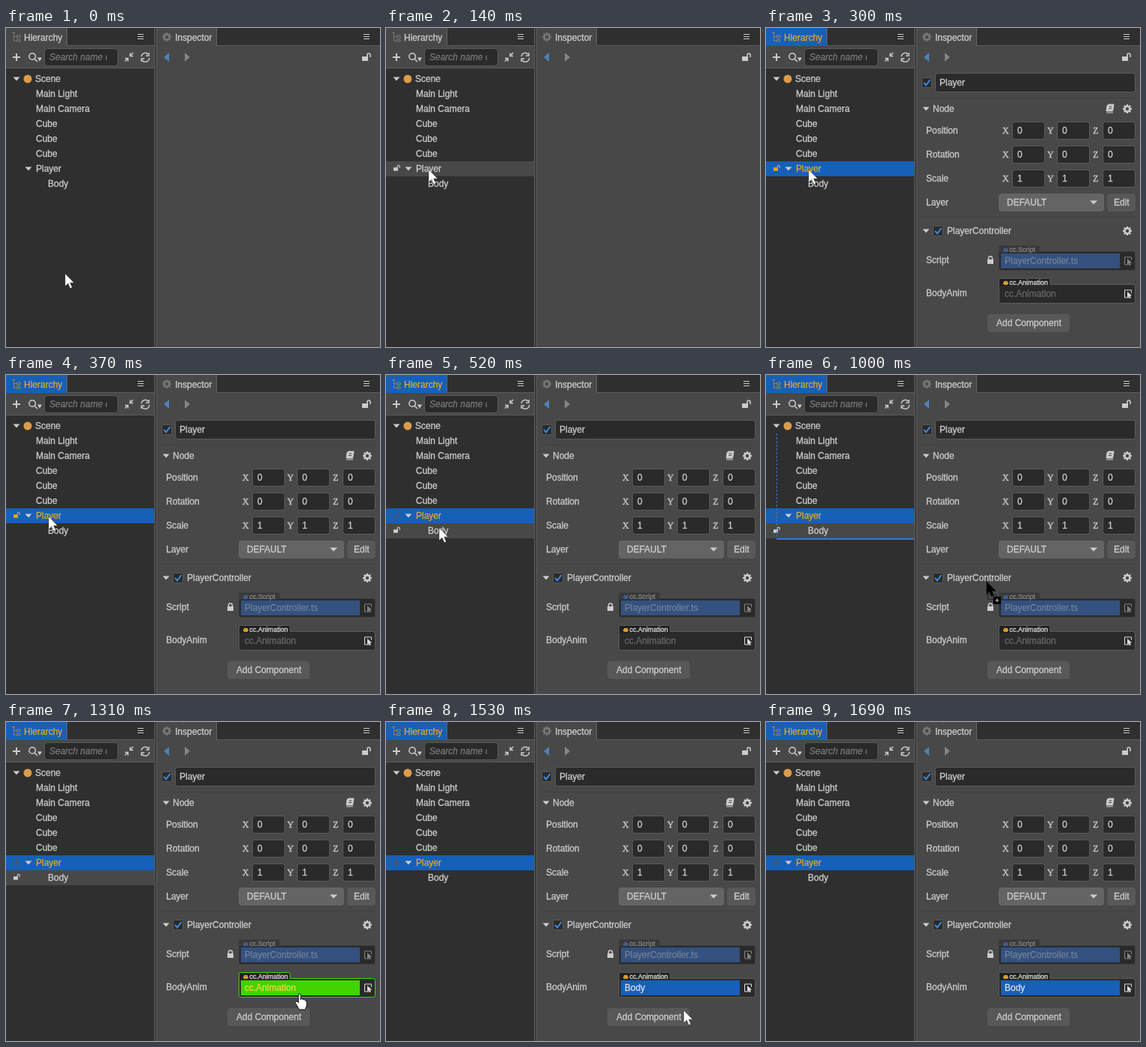
An HTML page with a canvas for the animation above (1.77 s loop, 500 by 426 pixels).

```html
<!DOCTYPE html>
<html lang="en">
<head>
<meta charset="utf-8">
<title>Assigning a node to a component property</title>
<style>
html, body { margin: 0; width: 100%; height: 100%; overflow: hidden; background: #484848; }
canvas { display: block; }
</style>
</head>
<body>
<canvas id="stage" width="500" height="426"></canvas>
<script>
const c = document.getElementById('stage').getContext('2d');
const LOOP = 1770;
const SANS = '"Liberation Sans", Arial, sans-serif';
const PANEL = '#484848', DARK = '#2f2f2f', FIELD = '#2a2a2a', EDGE = '#5b5b5b';
const TEXT = '#cccccc', DIM = '#777777', BLUE = '#1660b8', ORANGE = '#e2a52b';

// [time, x, y, shape]: the pointer holds each pose until the next one
const POINTER = [
  [0, 79, 328, 'arrow'], [60, 66, 257, 'arrow'], [140, 57, 189, 'arrow'],
  [450, 63, 197, 'arrow'], [520, 71, 204, 'arrow'], [600, 75.5, 208, 'arrow'],
  [850, 88, 211, 'drag'], [930, 183, 238, 'drag'], [1000, 295, 276, 'drag'],
  [1080, 368, 343, 'drag'], [1160, 391, 363, 'drag'], [1310, 391, 363, 'hand'],
  [1530, 398, 385, 'arrow'], [1610, 410, 410, 'arrow'], [1690, 420, 440, 'arrow']
];
const TREE = ['Main Light', 'Main Camera', 'Cube', 'Cube', 'Cube'];

function rect(x, y, w, h, color) {
  c.fillStyle = color;
  c.fillRect(x, y, w, h);
}

function box(x, y, w, h, fill, stroke, r = 3) {
  c.beginPath();
  c.roundRect(x + .5, y + .5, w - 1, h - 1, r);
  c.fillStyle = fill;
  c.fill();
  c.strokeStyle = stroke || fill;
  c.lineWidth = 1;
  c.stroke();
}

// The hairline stroke gives the slightly heavy look of hinted interface text
function text(s, x, y, color = TEXT, font = '12px ' + SANS) {
  c.font = font;
  c.fillStyle = c.strokeStyle = color;
  c.lineWidth = .3;
  c.fillText(s, x, y + 4);
  c.strokeText(s, x, y + 4);
}

function poly(points, color) {
  c.beginPath();
  for (let i = 0; i < points.length; i += 2) c.lineTo(points[i], points[i + 1]);
  c.closePath();
  c.fillStyle = color;
  c.fill();
}

function path(d, color, width = 1, x = 0, y = 0, fill) {
  c.save();
  c.translate(x, y);
  const shape = new Path2D(d);
  if (fill) {
    c.fillStyle = fill;
    c.fill(shape);
  }
  c.strokeStyle = color;
  c.lineWidth = width;
  c.stroke(shape);
  c.restore();
}

function dot(x, y, r, color) {
  c.beginPath();
  c.arc(x, y, r, 0, 7);
  c.fillStyle = color;
  c.fill();
}

const fold = (x, y, w = 4.5, color = TEXT) =>
  poly([x - w, y - 2.5, x + w, y - 2.5, x, y + 2.5], color);

function gear(x, y, color) {
  c.save();
  c.translate(x, y);
  c.strokeStyle = color;
  c.lineWidth = 2.4;
  c.beginPath();
  c.arc(0, 0, 3.4, 0, 2 * Math.PI);
  c.stroke();
  for (let i = 0; i < 8; i++) {
    c.rotate(Math.PI / 4);
    rect(-1.2, -6, 2.4, 2.5, color);
  }
  c.restore();
}

function openLock(x, y, color, scale = 1) {
  c.save();
  c.translate(x, y);
  c.scale(scale, scale);
  rect(-6, -1, 8, 6, color);
  path('M1 -1V-3A2 2 0 0 1 5 -3V0', color, 1.6);
  c.restore();
}

function menu(x) {
  for (const y of [8, 11, 14]) rect(x - 4, y, 8, 1, TEXT);
}

function checkbox(x, y) {
  box(x - 7, y - 7, 14, 14, FIELD, EDGE, 2);
  path('M-4 0L-1 3.5L4.5 -4', '#3c8be0', 2, x, y);
}

function tab(x, w, label, active) {
  rect(x, 0, w, 24, active ? BLUE : PANEL);
  rect(x + w - 1, 0, 1, 24, '#666666');
  text(label, x + 24, 13, active ? ORANGE : TEXT);
}

function hierarchy(t, hover) {
  const selected = t >= 220;
  rect(0, 0, 198, 426, DARK);
  rect(0, 23, 198, 1, EDGE);
  tab(0, 82, 'Hierarchy', selected);
  path('M8 6.5H12M10.5 7V17.5M10.5 11.5H14M10.5 17H14M14.5 10H19V13H14.5ZM14.5 15.5H19V18H14.5Z',
    selected ? '#98834c' : '#777777');
  menu(180);

  rect(0, 24, 198, 29, PANEL);
  rect(0, 53, 198, 1, EDGE);
  rect(9, 38, 10, 2, TEXT);
  rect(13, 34, 2, 10, TEXT);
  path('M39.5 38A4.3 4.3 0 1 1 30.9 38A4.3 4.3 0 1 1 39.5 38M38 41L42 45', TEXT, 1.5);
  fold(45, 42, 3);
  box(51, 27, 99, 24, FIELD, EDGE, 4);
  c.save();
  c.beginPath();
  c.rect(58, 28, 77, 22);
  c.clip();
  text('Search name or id', 58, 39, DIM, 'italic 12px ' + SANS);
  c.restore();
  path('M170 33L166 37M166 33.5V37.5H170M159 44.5L163 40.5M159 40.5H163V44.5', TEXT, 1.5);
  path('M181 38A5.2 5.2 0 0 1 190 35M191 33V37H187M191.5 40A5.2 5.2 0 0 1 182 43M181 45V41H185', TEXT, 1.4);

  if (hover === 'Player' || selected) rect(0, 178, 198, 20, selected ? BLUE : PANEL);
  if (hover === 'Body') rect(0, 198, 198, 20, PANEL);
  fold(14, 68);
  dot(29, 68, 5.5, '#dc9c4a');
  text('Scene', 39, 68);
  TREE.forEach((name, i) => text(name, 40, 88 + i * 20));
  fold(30, 188);
  text('Player', 40, 188, selected ? ORANGE : TEXT);
  text('Body', 56, 208);
  if (hover === 'Player') openLock(14.5, 187, selected ? ORANGE : TEXT, .75);
  else if (selected) openLock(14.5, 187, '#3f5a78', .75);
  if (hover === 'Body') openLock(14.5, 207, TEXT, .75);

  if (t >= 850 && t < 1080) {
    c.setLineDash([3, 2]);
    path('M14.5 78V218', '#3975d0');
    c.setLineDash([]);
    rect(14, 218, 184, 2, '#3975d0');
  } else if (t >= 1080) rect(14, 182, 1, 12, '#3f5a78');
}

function picker(x, y, color) {
  path('M3 5H-4.5V-5H4.5V-1', color, 1, x, y);
  poly([x - 1, y - 3, x - 1, y + 5, x + 1, y + 3.5, x + 2.5, y + 6, x + 4, y + 5, x + 2.5, y + 3, x + 5, y + 2.5], color);
}

function slot(y, type, value, look) {
  const width = type.length * 4.6 + 14;
  box(311, y - 20, width, 12, look.tab, look.edge, 2);
  box(311, y - 12, 183, 26, FIELD, look.edge);
  rect(312, y - 13, width - 2, 3, look.tab);
  if (look.fill) rect(314, y - 9, 159, 20, look.fill);
  rect(318, y - 16, 5, 5, look.icon);
  rect(317, y - 14, 7, 2, look.icon);
  text(type, 325.5, y - 15, look.label, '9px ' + SANS);
  text(value, 319, y + 1, look.text);
  picker(484, y + 1, look.pick);
}

function inspector(t) {
  rect(198, 0, 4, 426, '#3c3c3c');
  rect(198, 0, 1, 426, EDGE);
  rect(201, 0, 1, 426, EDGE);
  rect(202, 0, 298, 426, PANEL);
  rect(282, 0, 218, 24, DARK);
  rect(282, 23, 218, 1, EDGE);
  tab(202, 80, 'Inspector');
  gear(215, 12, DIM);
  menu(482);
  poly([211, 39, 218, 33, 218, 45], '#4b83b8');
  poly([246, 39, 239, 33, 239, 45], '#858585');
  openLock(482, 39, TEXT);
  if (t < 300) return;

  checkbox(215, 73);
  box(226, 60, 268, 26, FIELD, EDGE);
  text('Player', 232, 73);
  rect(208, 93, 286, 1, '#404040');
  fold(214, 108);
  text('Node', 223, 108);
  path('M456 103.5L458 102H465L463.5 111H455ZM455 113H464', TEXT, 1, 0, 0, TEXT);
  path('M458.5 105H462.5M458 107.5H462', PANEL);
  gear(483, 108, TEXT);
  ['Position', 'Rotation', 'Scale'].forEach((name, row) => {
    const y = 137 + row * 32;
    text(name, 214, y);
    [...'XYZ'].forEach((axis, i) => {
      const x = [329, 389, 450][i];
      text(axis, x - 13, y - .5, TEXT, '12px "Liberation Serif", serif');
      box(x, y - 12, 44, 24, FIELD, EDGE);
      text(row === 2 ? '1' : '0', x + 7, y);
    });
  });
  text('Layer', 214, 233);
  box(311, 221, 141, 24, '#646464');
  text('DEFAULT', 322, 233);
  fold(438, 233, 5);
  box(456, 221, 38, 24, '#585858');
  text('Edit', 465, 233);

  rect(208, 252, 286, 1, '#404040');
  fold(214, 271);
  checkbox(230, 271);
  text('PlayerController', 242, 271);
  gear(483, 271, TEXT);
  text('Script', 214, 310);
  rect(296, 309, 8, 6, TEXT);
  path('M297.5 310V307.5A2.5 2.5 0 0 1 302.5 307.5V310', TEXT, 1.5);
  slot(310, 'cc.Script', 'PlayerController.ts', {
    tab: '#393939', edge: '#404040', fill: '#34517f', icon: '#3f5c88',
    label: '#858585', text: '#707f95', pick: '#858585'
  });

  text('BodyAnim', 214, 354);
  const over = t >= 1080 && t < 1380, assigned = t >= 1380;
  slot(354, 'cc.Animation', assigned ? 'Body' : 'cc.Animation', {
    tab: '#202020', edge: over ? '#43d800' : EDGE,
    fill: over ? '#40d400' : assigned ? BLUE : '', icon: '#d69b2d', label: '#dddddd',
    text: over ? '#f0d83c' : assigned ? '#dddddd' : '#666666', pick: '#dddddd'
  });
  box(296, 382, 110, 24, '#585858');
  text('Add Component', 308, 394);
}

function pointer([, x, y, shape]) {
  if (shape === 'hand') {
    path('M0 1Q0 -1 2 0L3 1V8L4 6Q6 5 6 8Q8 6 9 9Q11 8 11 11V16L9 21H1L-3 14Q-6 10 -2 10L0 12Z',
      '#111111', 1, x, y, '#ffffff');
    return;
  }
  const drag = shape === 'drag';
  path('M0 0V17L4 13.3L6.8 19.8L9.5 18.6L6.8 12.2H12Z',
    drag ? '#000000' : '#222222', .5, x, y, drag ? '#000000' : '#ffffff');
  if (!drag) return;
  c.setLineDash([2, 1]);
  path('M1.5 17.5H12.5V23.5H1.5Z', '#111111', 1, x, y);
  c.setLineDash([]);
  rect(x + 9, y + 20, 10, 10, '#000000');
  path('M11.5 25H16.5M14 22.5V27.5', '#cccccc', 1, x, y);
}

function draw(now) {
  const t = now % LOOP;
  const pose = POINTER.findLast(p => p[0] <= t);
  const hover = t < 140 || t >= 1380 ? '' : t < 520 ? 'Player' : 'Body';
  hierarchy(t, hover);
  inspector(t);
  pointer(pose);
}

const start = performance.now();
function tick() {
  draw(performance.now() - start);
  requestAnimationFrame(tick);
}
tick();
</script>
</body>
</html>
```
